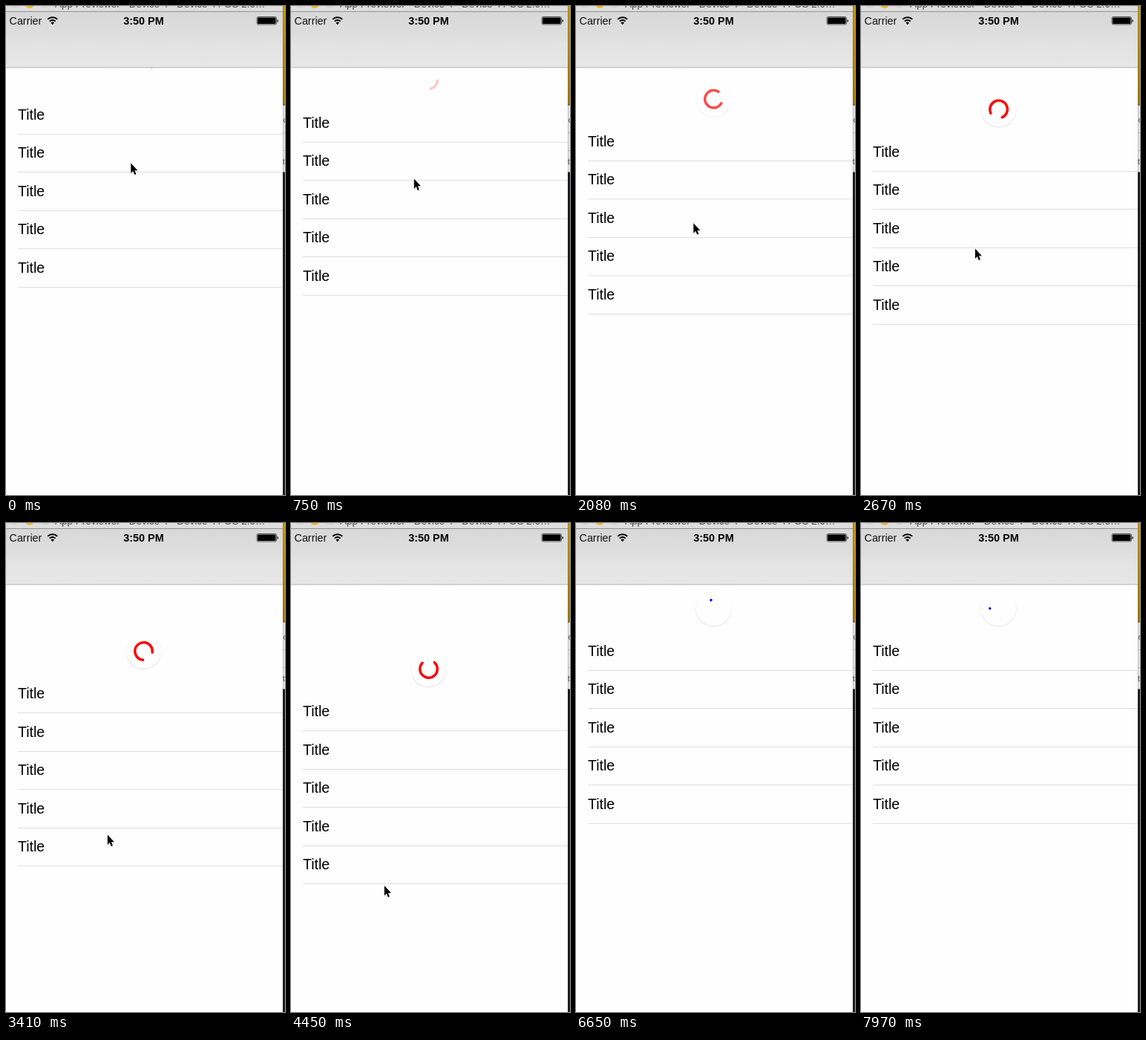
Recreate the animation shown at these times as an HTML page. Size 376 by 658 pixels, loop 8000 ms.

```html
<!DOCTYPE html>
<html lang="en">
<head>
<meta charset="utf-8">
<title>Pull to refresh</title>
<style>
  html, body { margin: 0; width: 100%; height: 100%; overflow: hidden; background: #fefefe; }
  svg { display: block; width: 376px; height: 658px; }
  text { font-family: "Liberation Sans", Arial, Helvetica, sans-serif; }
</style>
</head>
<body>
<svg viewBox="0 0 376 658" xmlns="http://www.w3.org/2000/svg">
  <defs>
    <linearGradient id="bar" x1="0" y1="0" x2="0" y2="1">
      <stop offset="0" stop-color="#d8d8d8"/>
      <stop offset=".4" stop-color="#dedede"/>
      <stop offset=".6" stop-color="#e3e3e3"/>
      <stop offset="1" stop-color="#e7e7e7"/>
    </linearGradient>
    <linearGradient id="gold" x1="0" y1="0" x2="0" y2="1">
      <stop offset="0" stop-color="#c99b10"/>
      <stop offset="1" stop-color="#a87c0c"/>
    </linearGradient>
    <filter id="soft" x="-20%" y="-20%" width="140%" height="140%">
      <feGaussianBlur stdDeviation=".6"/>
    </filter>
  </defs>

  <rect width="376" height="658" fill="#fefefe"/>
  <g id="list"></g>

  <g id="spinner">
    <g id="disc">
      <circle cy=".7" r="24" fill="#dedede" filter="url(#soft)"/>
      <circle r="23.8" fill="#fefefe"/>
    </g>
    <path id="arc" fill="none" stroke-width="3.4" stroke-linecap="round"/>
  </g>
  <rect id="hint" x="194.5" y="83" width="3" height="1.6" rx=".8" fill="#cacaca"/>

  <!-- window title and status bar -->
  <rect y="8" width="373" height="75" fill="url(#bar)"/>
  <rect y="82.3" width="373" height="1" fill="#b4b4b4"/>
  <rect width="373" height="7" fill="#dedede"/>
  <circle cx="12" cy="-3" r="6" fill="#d2d2d2"/>
  <circle cx="32" cy="-3" r="6" fill="#f0b429"/>
  <circle cx="52" cy="-3" r="6" fill="#d2d2d2"/>
  <text x="66" y="1.6" font-size="13.5" fill="#444">App Previewer - Device 4 - Device 4 / OS 2.0…</text>
  <rect y="7" width="373" height="1" fill="#929292"/>

  <text x="4.6" y="25" font-size="14.3" fill="#111">Carrier</text>
  <g fill="none" stroke="#000" stroke-width="2">
    <path d="M56.2 17.9a9.2 9.2 0 0 1 13 0M58.8 20.6a5.4 5.4 0 0 1 7.8 0"/>
  </g>
  <path d="M62.7 25.2l-2.3-2.7a3.4 3.4 0 0 1 4.6 0z"/>
  <text x="185.5" y="25" font-size="14.4" font-weight="700" text-anchor="middle">3:50 PM</text>
  <rect x="338" y="14.5" width="26.5" height="10.5" rx="2" fill="none" stroke="#333" stroke-width=".8"/>
  <rect x="339" y="15.5" width="24.5" height="8.5" rx="1"/>
  <path d="M365.6 18a2 2 0 0 1 0 3.8z"/>

  <!-- desktop strip behind the window -->
  <rect x="373" width="3" height="133" fill="url(#gold)"/>
  <rect x="373" y="133" width="3" height="91" fill="#e4e4e4"/>
  <g fill="#bdbdbd">
    <rect x="373" y="132.5" width="3" height="1.2" fill="#6a5a2a"/>
    <rect x="373" y="170" width="3" height="1"/>
    <rect x="373" y="194" width="3" height="1"/>
  </g>
  <text x="373.5" y="157" font-size="11" fill="#555">c</text>
  <text x="372.8" y="213" font-size="11" fill="#555">t</text>
  <rect x="373" y="223.5" width="3" height="435" fill="#201d23"/>
  <rect x="373" width="1" height="658" fill="#000" opacity=".18"/>

  <g id="cursor">
    <g transform="translate(.3 -.4) scale(.86 .93)">
      <path d="M0 0V14.5l3.4-3.2 2.3 5.2 2.5-1.1-2.2-5h4.6z" transform="translate(.6 1.4)" fill="#000" opacity=".25" filter="url(#soft)"/>
      <path d="M0 0V14.5l3.4-3.2 2.3 5.2 2.5-1.1-2.2-5h4.6z" stroke="#fff" stroke-width="1.6" paint-order="stroke"/>
    </g>
  </g>
</svg>
<script>
const LOOP = 8000, STEP = 147.55, TICK = 148;
const ROW = 51.5, FULL = 290, CAP = 8, CYCLE = 1410, RELEASE = 32;
const $ = id => document.getElementById(id);
const clamp = x => Math.max(0, Math.min(1, x));
const smooth = x => { x = clamp(x); return x * x * (3 - 2 * x); };

// [step, pull distance]
const PULL = [[0, 0], [8, 17.5], [10, 20.5], [16, 44], [18, 50], [23, 83.5], [24, 90],
  [27, 103], [30, 107.5], [31, 107.5], [32, 88], [33, 48], [34, 30], [35, 26]];
// [step, x, y]
const POINTER = [[0, 168, 212], [10, 163, 254], [16, 155.5, 312], [18, 153.5, 327], [23, 136.5, 420],
  [24, 133.5, 438], [27, 127.5, 475], [30, 125.5, 488.5], [32, 125.5, 488.5], [34, 128.5, 486],
  [40, 128.5, 486], [41, 147, 505], [42, 190, 540], [43, 240, 578], [44, 286, 603]];
const POINTER_END = 45;

function sample(keys, s, col) {
  let i = 0;
  while (i < keys.length - 2 && s > keys[i + 1][0]) i++;
  const a = keys[i], b = keys[i + 1];
  return a[col] + (b[col] - a[col]) * clamp((s - a[0]) / (b[0] - a[0]));
}

// The span includes the round caps.
function arcPath(from, span, r = 11.8) {
  const inset = Math.min(CAP, span / 2);
  const a = from + inset, sweep = Math.max(span - 2 * inset, .4);
  const pt = deg => {
    const t = deg * Math.PI / 180;
    return (r * Math.cos(t)).toFixed(2) + " " + (r * Math.sin(t)).toFixed(2);
  };
  return `M${pt(a)}A${r} ${r} 0 ${sweep > 180 ? 1 : 0} 1 ${pt(a + sweep)}`;
}

function pulling(off) {
  const span = FULL * clamp(off / 35);
  return { from: 9 * off - 15 - span, span, color: "#f00" };
}

function spinning(ms) {
  const t = ms - 5150;
  const n = Math.floor(t / CYCLE), p = t / CYCLE - n;
  const head = smooth(p * 2), tail = smooth(p * 2 - 1);
  return {
    from: -107 + .279 * t + FULL * (n + tail),
    span: FULL * (head - tail),
    color: ["#f00", "#0f0", "#00f"][n + 1]
  };
}

$("list").innerHTML = Array.from({ length: 5 }, (_, i) =>
  `<text x="16" y="${152.6 + i * ROW}" font-size="19.5">Title</text>
   <rect x="16" y="${172 + i * ROW}" width="357" height=".5" fill="#bcbcc0"/>`).join("");

function draw(ms) {
  const s = Math.floor(ms / STEP);
  const off = sample(PULL, s, 1);
  const spin = s >= RELEASE;
  const a = spin ? spinning(Math.min(s * TICK, 7969)) : pulling(off);

  $("list").setAttribute("transform", `translate(0 ${off})`);
  $("spinner").setAttribute("transform", `translate(185.5 ${89 + off})`);
  $("spinner").style.display = s ? "" : "none";
  $("hint").style.display = s ? "none" : "";
  $("disc").setAttribute("opacity", clamp((off - 21) / 25 + (spin ? 1 : 0)));
  $("arc").setAttribute("d", arcPath(a.from, a.span));
  $("arc").setAttribute("stroke", a.color);
  $("arc").setAttribute("opacity", spin ? 1 : clamp(off / 50));

  $("cursor").style.display = s < POINTER_END ? "" : "none";
  $("cursor").setAttribute("transform", `translate(${sample(POINTER, s, 1)} ${sample(POINTER, s, 2)})`);
}

const start = performance.now();
function frame() {
  draw((performance.now() - start) % LOOP);
  requestAnimationFrame(frame);
}
frame();
</script>
</body>
</html>
```
